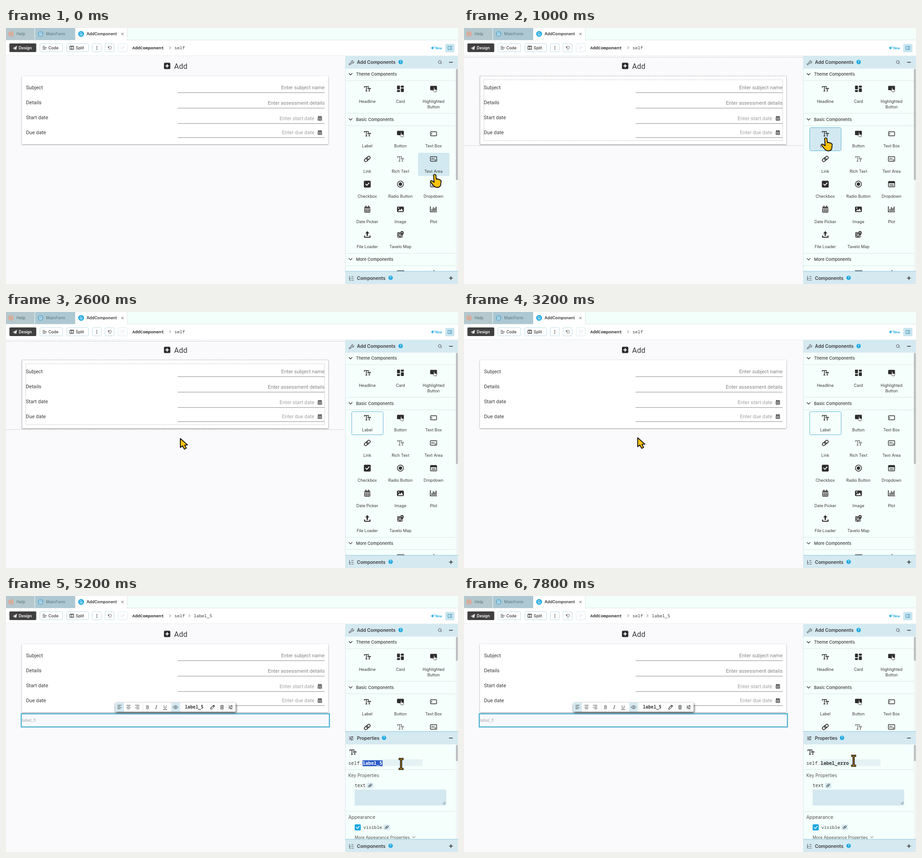
These frames come from a looping animation (993x564 px, 8 s). An HTML page:

```html
<!DOCTYPE html>
<html lang="en">
<head>
<meta charset="utf-8">
<title>Form designer</title>
<style>
html, body { margin: 0; width: 100%; height: 100%; overflow: hidden; background: #fafafc; }
svg { display: block; width: 993px; height: 564px; }
text { font-family: Inter, "Open Sans", sans-serif; fill: #3a3a3a; white-space: pre; }
.form { font-family: Roboto, Arial, sans-serif; font-size: 11.15px; }
.mono { font-family: "Noto Sans Mono", "DejaVu Sans Mono", monospace; }
.line { fill: none; stroke: #2d2d2d; stroke-width: 1.2; stroke-linecap: round; stroke-linejoin: round; }
.thin { stroke-width: .9; stroke: #444; }
.cursor { fill: #ffc20e; stroke: #111; stroke-width: 2; stroke-linejoin: round; }
</style>
</head>
<body>
<svg id="stage" viewBox="0 0 993 564"></svg>
<script>
const DARK = '#2d2d2d', BLUE = '#1ba8e0', BAR = '#d5e9f1', PANEL = '#f5fffc', EDGE = '#d9e6e8';

const rect = (x, y, w, h, fill, more = '') =>
  `<rect x="${x}" y="${y}" width="${w}" height="${h}" fill="${fill}" ${more}/>`;
const text = (x, y, s, size, more = '') =>
  `<text x="${x}" y="${y}" font-size="${size}" ${more}>${s}</text>`;
const mono = (x, y, s, size, more = '') => text(x, y, s, size, `class="mono" ${more}`);
const path = (d, more = '') => `<path d="${d}" ${more}/>`;
const line = (d, more = '') => path(d, `class="line" ${more}`);
const thin = d => path(d, 'class="line thin"');
const hline = (x, x2, y, color, more = '') =>
  path(`M${x} ${y}H${x2}`, `stroke="${color}" fill="none" ${more}`);
const vline = (x, y, y2, color) => path(`M${x} ${y}V${y2}`, `stroke="${color}"`);
const at = (x, y, body, scale = 1) => `<g transform="translate(${x} ${y}) scale(${scale})">${body}</g>`;
const group = (id, body, more = '') => `<g id="${id}" ${more}>${body}</g>`;
const mid = 'text-anchor="middle"', end = 'text-anchor="end"';

const calendar = rect(-6.5, -5.5, 13, 12.5, DARK, 'rx="1.5"') + rect(-4, -8, 2, 4, DARK) + rect(2, -8, 2, 4, DARK) +
  hline(-6.5, 6.5, -2.5, '#fff') +
  [-1, 2.7].map(y => [-5, -1.3, 2.4].map(x => rect(x, y, 2.6, 2.4, '#fff')).join('')).join('');
const letters = color => path('M-6.5 -2.5V-5H2.5V-2.5M-2 -5V5M-4 5H0M1.5 1V-1H7V1M4.3 -1V5M3 5H5.6',
  `fill="none" stroke="${color}" stroke-width="1.5"`);
const press = rect(-7.5, -6.5, 15, 9.5, DARK, 'rx="1.5"') +
  path('M.5 -2c0 -1.500 2 -1.500 2 0V1l3 .7c1.500 .4 1.500 1.500 1.200 3l-.7 2H1.500L-1.500 3.500c0 -1 1 -1.200 2 -.5z',
    `fill="#fff" stroke="${DARK}" stroke-width=".9"`);
const box = rect(-6.7, -4.5, 13.4, 9, 'none', `rx="1.2" stroke="${DARK}" stroke-width="1.4"`);
const chain = rect(-7.5, -3, 9, 6, 'none', `rx="3" stroke="${DARK}" stroke-width="1.6"`) +
  rect(-1.5, -3, 9, 6, 'none', `rx="3" stroke="${DARK}" stroke-width="1.6"`);
const icons = {
  label: letters(DARK),
  rich: letters('#777'),
  card: rect(-7.5, -7, 6.5, 8, DARK, 'rx="1"') + rect(-7.5, 2.5, 6.5, 4.5, DARK, 'rx="1"') +
    rect(1, -7, 6.5, 4.5, DARK, 'rx="1"') + rect(1, -1, 6.5, 8, DARK, 'rx="1"'),
  button: press,
  textbox: box + line('M-4 -1.5V1.5'),
  link: `<g transform="rotate(-40)">${chain}</g>`,
  area: rect(-7, -5, 14, 10, 'none', `rx="1" stroke="${DARK}" stroke-width="1.3"`) +
    text(-5.5, 1, 'abc', 5, 'font-weight="700"') + line('M5 1.5L3.5 3'),
  check: rect(-7.5, -7.5, 15, 15, DARK, 'rx="2"') + line('M-3.5 0L-1 2.7L4 -2.7', 'style="stroke:#fff;stroke-width:1.8"'),
  radio: `<circle r="6.7" fill="none" stroke="${DARK}" stroke-width="1.5"/><circle r="3.7" fill="${DARK}"/>`,
  drop: rect(-6.8, -6, 13.6, 12, 'none', `rx="1.5" stroke="${DARK}" stroke-width="1.5"`) + rect(-7, -6, 14, 4, DARK) +
    line('M-4 .5H4M-4 3.2H4'),
  date: calendar,
  image: rect(-7.5, -6, 15, 12, DARK, 'rx="2"') + path('M-5.5 4L-2 0L0 2L2.5 -2L6 4z', 'fill="#fff"') +
    '<circle cx="-3.8" cy="-2.7" r="1.3" fill="#fff"/>',
  plot: line('M-7 -6V5.5H7', 'style="stroke-width:1.7"') + line('M-3.5 3V0M-.5 3V-4M2.5 3V-2M5.5 3V-5', 'style="stroke-width:1.8"'),
  file: path('M0 -7.5L4.5 -2.5H1.5V3H-1.5V-2.5H-4.5z', `fill="${DARK}"`) + line('M-6 3V6H6V3', 'style="stroke-width:2.2"'),
  map: rect(-7, -5, 12, 12, '#555', 'rx="1"') + line('M-6 6L4 -4M-5 -2L4 6', 'style="stroke:#ccc"') +
    path('M3.5 3C0 -1 -.5 -2.5 -.5 -4a4 4 0 0 1 8 0C7.5 -2.5 7 -1 3.5 3z', `fill="${DARK}" stroke="#fff" stroke-width=".7"`) +
    '<circle cx="3.5" cy="-4" r="1.3" fill="#fff"/>',
};

const help = (x, y) => `<circle cx="${x}" cy="${y}" r="4.8" fill="${BLUE}"/>` +
  text(x, y + 2.6, '?', 7, `${mid} font-weight="600" style="fill:#fff"`);
const chevron = (x, y) => line(`M${x - 3.5} ${y - 2}l3.5 3.5l3.5 -3.5`);
const plus = (x, y, add) => line(`M${x - 3.5} ${y}h7` + (add ? `M${x} ${y - 3.5}v7` : ''), 'style="stroke-width:1.6"');
const sliders = (x, y) => at(x, y, thin('M-4.5 -3H4.5M-4.5 0H4.5M-4.5 3H4.5') +
  [[2, -3], [-2, 0], [1, 3]].map(([a, b]) => `<circle cx="${a}" cy="${b}" r="1.2" fill="${DARK}"/>`).join(''));
const pencil = (x, y) => at(x, y, line('M-4.5 4.5l1 -3.5L2.5 -4.5L4.5 -2.5L-1 3.5zM1 -3L3 -1', 'style="stroke-width:1.1"'));
const trash = (x, y, color) => at(x, y, line('M-3.5 -3H3.5M-1 -4.3H1M-2.7 -3V4.3H2.7V-3M-.9 -1V2.5M.9 -1V2.5', `style="stroke:${color};stroke-width:.9"`));
const linkTag = (x, y) => rect(x - 7, y - 6, 14, 12, BAR, 'rx="2"') + at(x, y, icons.link, .55);

const tabs = () => rect(0, 0, 993, 27, '#f2fffb') +
  rect(0, 0, 62.5, 26.5, '#b4c8ce') + rect(63.5, 0, 88.5, 26.5, '#adc8d2') + rect(152, 0, 115, 27, '#fff') +
  vline(266.5, 0, 27, EDGE) + hline(0, 152, 26.5, '#c7d8dc') + hline(267, 993, 26.5, EDGE) +
  '<circle cx="11" cy="13" r="6" fill="#d9aa98"/>' + text(11, 16, '?', 8, `${mid} style="fill:#b4c8ce"`) +
  [[76, '#72b4d2'], [165, BLUE]].map(([x, c]) => `<circle cx="${x}" cy="13" r="6.3" fill="${c}"/>` +
    at(x, 13, line('M-2 -3H1L2.5 -1.5V3H-2zM-.5 0H1M-.5 1.5H1', 'style="stroke:#fff;stroke-width:.8"'))).join('') +
  text(23, 16.2, 'Help', 9, 'style="fill:#5c747d"') + text(88, 16.2, 'MainForm', 9, 'style="fill:#5c747d"') +
  text(177, 16.2, 'AddComponent', 8.75, 'font-weight="600"') +
  thin('M253.5 11l4.5 4.5M258 11l-4.5 4.5');

const tool = (x, w, fade) => rect(x + .5, 34.5, w - 1, 18, '#fff', `rx="2" stroke="#bfdde6" ${fade ? 'opacity=".6"' : ''}`);
const toolbar = () => rect(0, 27, 993, 34, '#fff') + hline(0, 993, 61.2, '#e3ecee') +
  rect(7.5, 34, 59, 19, '#404040', 'rx="2"') + tool(74, 51) + tool(133, 49) + tool(189, 21) + tool(217, 21) + tool(246, 21, 1) +
  at(19.5, 44, path('M-4.5 .5L4.5 -4.5L3 4L0 2.5L-1.5 4.5V2L3 -3L-2.5 1.5z', 'fill="#fff"')) +
  text(28, 46.8, 'Design', 8.5, 'font-weight="600" style="fill:#fff"') +
  line('M81 40.5h4M81 43.7h8M81 47h6') + text(93, 46.8, 'Code', 8.8, 'font-weight="500"') +
  at(144.5, 43.5, rect(-4, -3.5, 8, 7, 'none', `stroke="${DARK}" stroke-width="1.2"`) + line('M-4 -3H4M0 -3V3.5')) +
  text(153, 46.8, 'Split', 8.8, 'font-weight="500"') +
  [40.5, 43.7, 47].map(y => `<circle cx="199.5" cy="${y}" r=".9" fill="${DARK}"/>`).join('') +
  thin('M224.5 40.5v3h3M224.7 43.2a3.4 3.4 0 1 1 1 2.7') +
  line('M259.5 40.5v3h-3M259.3 43.2a3.4 3.4 0 1 0 -1 2.7', 'style="stroke:#ddd;stroke-width:.9"') +
  mono(277.5, 46.7, 'AddComponent', 9.65, 'font-weight="700"') + thin('M359.5 41l2.5 2.5l-2.5 2.5') +
  mono(370, 46.7, 'self', 9.65) +
  group('crumb', thin('M402 41l2.5 2.5l-2.5 2.5') + mono(412.5, 46.7, 'label_5', 9.65)) +
  path('M937 40.5l1 2.5l2.5 1l-2.5 1l-1 2.5l-1 -2.5l-2.5 -1l2.5 -1zM940.5 40v3M939 41.5h3', `fill="${BLUE}" stroke="${BLUE}" stroke-width=".5"`) +
  text(943, 46.5, 'New', 7, `font-weight="600" style="fill:${BLUE}"`) +
  rect(965, 35, 20, 18.5, '#c9e5ef', 'rx="2"') +
  rect(971, 40.5, 8, 7, 'none', 'stroke="#3b91b5"') + vline(976, 40.5, 47.5, '#3b91b5');

const rows = [['Subject', 130.5, 142.5, 'Enter subject name'], ['Details', 163.7, 176.5, 'Enter assessment details'],
  ['Start date', 197, 210.5, 'Enter start date'], ['Due date', 230.2, 241.5, 'Enter due date']];
const form = () => rect(35, 106, 673, 150, '#fff', 'style="filter:drop-shadow(0 1px 1.5px #0006)"') +
  rect(347, 76.5, 14, 14, DARK, 'rx="2.5"') + path('M354 79.7v7.6M350.2 83.5h7.6', 'stroke="#fff" stroke-width="2"') +
  text(369.3, 89.5, 'Add', 16.4, 'class="form" style="font-size:16.4px"') +
  rows.map(([name, y, rule, hint], i) => {
    const date = i > 1, hy = [130.5, 164.5, 198.5, 229.7][i];
    return `<text class="form rowname" x="44" y="${y + 4}">${name}</text>` +
      `<text class="form" x="${date ? 677.5 : 700}" y="${hy + 4}" ${end} style="fill:${date ? '#a2a2a2' : '#858585'}">${hint}</text>` +
      hline(377, 700, rule, '#8c8c8c') + (date ? at(689.5, hy + .7, calendar, .7) : '');
  }).join('');

const dash = (x, y, w, h) => rect(x, y, w, h, 'none', 'stroke="#b0b0b0" stroke-width=".8" stroke-dasharray="2.5 1.5"');
const dashLine = (y, color) => hline(0, 745, y, color, 'stroke-dasharray="2.5 1.5" stroke-width=".8"');
const outlines = () => group('outlines', dash(35.5, 105.8, 673, 152) + dash(43.5, 114, 656.5, 134) +
  group('greyLines', dashLine(64.5, '#b5b5b5') + dashLine(259, '#b5b5b5')));
const guides = () => group('guides',
  dashLine(64.5, '#e3a978') + dashLine(266, '#e3a978') + hline(0, 745, 264.5, '#f6e3d4') +
  vline(30, 68, 103, '#ddd') + vline(714, 68, 103, '#ddd') + hline(36, 708, 103.5, '#e0e0e0') +
  vline(30, 106, 258, '#eee') + vline(714, 106, 258, '#eee') +
  vline(38.5, 114, 245, '#bbb') + vline(705.5, 114, 245, '#bbb') +
  [[117, 145], [151, 178], [185, 211], [218, 244]].map(([a, b]) => vline(372.5, a, b, '#aaa')).join('') +
  [148, 181, 214].map(y => hline(49, 361, y, '#ddd')).join('') +
  [148, 182, 216].map(y => hline(383, 695, y, '#e0e0e0')).join('') +
  hline(48, 695, 250.5, '#ddd') + hline(40, 703, 262.5, BLUE, 'stroke-width="2"'));

const COLS = [793.7, 866.5, 939.3], ROW = 55.5;
const cells = [['label', 'Label'], ['button', 'Button'], ['textbox', 'Text Box'], ['link', 'Link'], ['rich', 'Rich Text'],
  ['area', 'Text Area'], ['check', 'Checkbox'], ['radio', 'Radio Button'], ['drop', 'Dropdown'], ['date', 'Date Picker'],
  ['image', 'Image'], ['plot', 'Plot'], ['file', 'File Loader'], ['map', 'Tavelo Map']];
const caption = (x, y, s) => text(x, y, s, 8.9, mid);
const section = (y, s) => chevron(757, y) + text(769, y + 3.4, s, 9.25, 'font-weight="500"');
const cellBox = (id, x, y, fill, more = '') => rect(x - 34.2, y - 13.5, 69, 51, fill, `id="${id}" rx="3" ${more}`);

const palette = () => rect(745, 61.5, 248, 503, PANEL) + vline(745.5, 61.5, 564, '#dbe7ea') + rect(745, 61.5, 248, 28, BAR) +
  at(758.5, 76, thin('M-4 4L0 0M0 0a3 3 0 0 1 4 -4l-2 2l.5 1.5l1.5 .5l2 -2a3 3 0 0 1 -4 3.5L-2.5 5a1.3 1.3 0 0 1 -2 -2z')) +
  text(771, 79.3, 'Add Components', 10.1, 'font-weight="600"') + help(867, 75) +
  '<circle cx="953" cy="75" r="3.2" class="line thin"/>' + thin('M955.5 77.5l2 2') + plus(977.5, 75.5) +
  section(102, 'Theme Components') + section(201.5, 'Basic Components') + section(509.7, 'More Components') +
  [116, 188, 215.5, 496.5, 523.5].map(y => hline(746, 988, y, EDGE)).join('') +
  cellBox('hover', 0, 0, '#d3e9f1') + cellBox('focus', COLS[0], 233, 'none', 'stroke="#5db4d6"') +
  at(COLS[0], 134, icons.label) + at(COLS[1], 134, icons.card) + at(COLS[2], 134, icons.button) +
  caption(COLS[0], 165, 'Headline') + caption(COLS[1], 165, 'Card') + caption(COLS[2], 165, 'Highlighted') + caption(COLS[2], 177, 'Button') +
  cells.map(([icon, name], i) => {
    const x = COLS[i % 3], y = 233 + ROW * Math.floor(i / 3);
    return at(x, y, icons[icon]) + caption(x, y + 30.2, name);
  }).join('') +
  rect(859, 534, 16, 2, '#555') + rect(939, 533.5, 2, 2, '#555') +
  rect(988, 89.5, 5, 447, '#f1f6f6') + rect(988.5, 90, 4, 245, '#b8bbbc', 'id="thumb" rx="2"');

const lower = () => hline(746, 988, 387, EDGE) + text(752, 403.2, 'Key Properties', 9.8, 'style="fill:#555"') +
  mono(766, 425.7, 'text', 10) + linkTag(800, 422) + rect(766, 431, 201, 35, '#d3e8f0', 'rx="2"') +
  thin('M960 463l5 -5M963 463.5l2 -2') + hline(746, 988, 479, EDGE) +
  text(752, 495.5, 'Appearance', 10.3, 'style="fill:#555"') + rect(766, 507.5, 13.5, 13.5, BLUE, 'rx="2"') +
  line('M769.5 514.3l2.5 2.5l4 -5', 'style="stroke:#fff;stroke-width:1.5"') + mono(785, 517.3, 'visible', 9.8) +
  linkTag(836.5, 514) + text(766, 539, 'More Appearance Properties', 8.9, 'style="fill:#555"') +
  thin('M893 534.5l3 3l3 -3');
const props = () => group('props', rect(746, 298, 247, 238, PANEL) + rect(746, 298, 247, 29, BAR) +
  hline(745, 993, 298.5, '#8dc6da') + sliders(758.5, 313.5) + text(771, 316.8, 'Properties', 9.9, 'font-weight="600"') +
  help(830.5, 312.5) + plus(977.5, 313) + at(762, 344, icons.label) +
  group('named', mono(752, 373.5, 'self.label_5', 10.4) + pencil(839, 369.5) +
    mono(858, 373, 'Label', 8.7, 'font-style="italic"') + help(888.5, 369.5) +
    rect(963, 360, 18, 20, '#d9313d', 'rx="2"') + trash(972, 370, '#fff')) +
  group('editing', rect(783, 360, 132, 14.5, '#e4f2f4') + mono(752, 372.3, 'self.', 10.4) +
    rect(783.3, 362, 44, 13, '#2c5bc6', 'id="selection"') + mono(783.2, 372.3, '', 10.4, 'id="entry" font-weight="600"') +
    rect(0, 362, 1, 12, '#222', 'id="caret"')) +
  group('lower', lower()) + rect(988, 327, 5, 209, '#f1f6f6') + rect(988.5, 328, 4, 36, '#b8bbbc', 'rx="2"'));
const footer = () => rect(745, 536, 248, 28, BAR) + hline(745, 993, 536, '#8dc6da') +
  thin('M754.5 547v8.5h3M754.5 551.5h3M759 547.5h4M759.5 551.5h4M759.5 555.5h4') +
  text(771, 554.5, 'Components', 10.1, 'font-weight="600"') + help(845, 550.3) + plus(977.5, 551, true);

const align = (x, a) => thin([-4, -1.3, 1.4, 4.1].map((y, i) => {
  const w = i % 2 ? 5.5 : 8.5;
  return `M${x - 4.2 + (8.5 - w) * a} ${244.5 + y}h${w}`;
}).join(''));
const selected = () => group('selected', rect(33.5, 259.5, 677, 29, '#f8f9fc', 'stroke="#2fa5c9" stroke-width="2"') +
  '<text class="form" x="35" y="276.5" font-style="italic" style="font-size:9.9px;fill:#aaa">label_5</text>' +
  rect(240, 235, 264.5, 20, '#fff', 'rx="2" style="filter:drop-shadow(1px 2px 2.5px #000b)"') +
  rect(240, 235, 19, 20, BAR) + rect(363, 235, 19, 20, BAR) + align(249.5, 0) + align(269, .5) + align(288, 1) +
  [301, 384, 443.5, 464.5, 484].map(x => vline(x, 235, 255, '#e4eaec')).join('') +
  text(311, 248.5, 'B', 10, mid) +
  text(330, 248.5, 'I', 10.5, `${mid} font-style="italic" style="font-family:'Noto Serif',serif"`) +
  text(349.5, 248.2, 'U', 9.5, mid) + hline(345, 354, 250.3, DARK) +
  thin('M367 245q5.5 -7.5 11 0q-5.5 7.5 -11 0z') + '<circle cx="372.5" cy="245" r="1.8" class="line thin"/>' +
  mono(393, 248.3, 'label_5', 9.75, 'font-weight="600"') + pencil(454, 245) + trash(474.5, 245, DARK) + sliders(493.5, 245));

const beam = 'M-5.5 -11h3.5q2 0 2 2V9q0 2 -2 2h-3.5M5.5 -11h-3.5q-2 0 -2 2V9q0 2 2 2h3.5';
const cursors = () => group('hand', at(0, 0, path('M-2.5 1.5C-2 -1 2.5 -1 3 1.5L4.2 11C6 9.5 8 10 8.5 11.5C10 10.5 12 11 12.3 12.8C14 12.3 15.5 13.5 15.2 15.5L14.5 23C14 28 11 30 6 30C1 30 -1 28 -3.5 24.5L-9 17.5C-10.5 15.5 -8.5 13 -6 14.5L-1 18z', 'class="cursor"'), .94)) +
  group('arrow', at(.5, .5, path('M0 0V21L5 17L9.5 25L14 22.5L10 15.5L17 15z', 'class="cursor"'), .94)) +
  group('beam', path(beam, 'fill="none" stroke="#111" stroke-width="4.5"') + path(beam, 'fill="none" stroke="#ffb020" stroke-width="1.1"'));

document.getElementById('stage').innerHTML = rect(0, 0, 993, 564, '#fafafc') + tabs() + toolbar() + form() +
  outlines() + guides() + selected() + palette() + props() + footer() + cursors();

const $ = id => document.getElementById(id);
const show = (id, on) => $(id).style.display = on ? '' : 'none';
const names = document.querySelectorAll('.rowname');

// time, x, y of the pointer tip
const track = [[0, 941.5, 323], [200, 935, 318], [400, 892, 293], [600, 838, 262], [800, 800, 244], [1000, 794.5, 242.5],
  [1200, 700, 252], [1400, 530, 270], [1600, 410, 282], [1800, 386, 282.5], [2200, 384, 280], [2400, 384, 280],
  [2800, 381, 276.5], [3200, 381, 276.5], [3400, 500, 307], [3600, 705, 364], [3800, 824, 398.5], [4000, 836, 381],
  [4200, 839, 370], [4600, 839, 370], [4800, 850, 370], [5200, 868, 370], [5600, 868, 370], [6200, 856, 363], [8000, 856, 363]];
function place(t) {
  const i = track.findIndex(k => k[0] > t);
  const [t0, x0, y0] = track[i - 1], [t1, x1, y1] = track[i], p = (t - t0) / (t1 - t0);
  return [x0 + (x1 - x0) * p, y0 + (y1 - y0) * p];
}

function draw(t) {
  const [x, y] = place(t);
  const placed = t >= 3400, edit = t >= 4600, drag = t >= 1200 && t < 2600;
  const kind = t < 1200 || (t >= 4200 && t < 4800) ? 'hand' : t < 4800 ? 'arrow' : 'beam';
  for (const id of ['hand', 'arrow', 'beam']) show(id, id === kind);
  $(kind).setAttribute('transform', `translate(${x} ${y})`);

  const outlined = t >= 1000 && t < 2800;
  show('outlines', outlined);
  show('greyLines', !drag);
  show('guides', drag);
  names.forEach(n => n.setAttribute('x', outlined ? 43.5 : 44));

  const col = COLS.findIndex(c => Math.abs(x - c) < 36.4);
  const row = Math.floor((y - 219) / ROW);
  show('hover', t < 1200 && col >= 0);
  if (col >= 0) $('hover').setAttribute('transform', `translate(${COLS[col]} ${233 + ROW * row})`);
  show('focus', t >= 1000 && !placed);

  for (const id of ['crumb', 'selected', 'props']) show(id, placed);
  $('thumb').setAttribute('height', placed ? 53 : 245);
  show('named', !edit);
  show('editing', edit);
  $('lower').setAttribute('transform', `translate(0 ${edit ? -4.5 : 0})`);

  const picked = t < 5800;
  const typed = Math.max(0, Math.floor((t - 6600) / 200));
  const entry = t < 6600 ? 'label_5' : 'label_' + 'erro'.slice(0, typed);
  show('selection', picked);
  $('entry').textContent = entry;
  $('entry').style.fill = picked ? '#fff' : '#333';
  show('caret', !picked && t < 7800);
  $('caret').setAttribute('x', 783.3 + entry.length * 6.25);
}

const start = performance.now();
function tick() {
  const t = (performance.now() - start) % 8000;
  draw(Math.floor(t / 200) * 200);
  requestAnimationFrame(tick);
}
tick();
</script>
</body>
</html>
```
